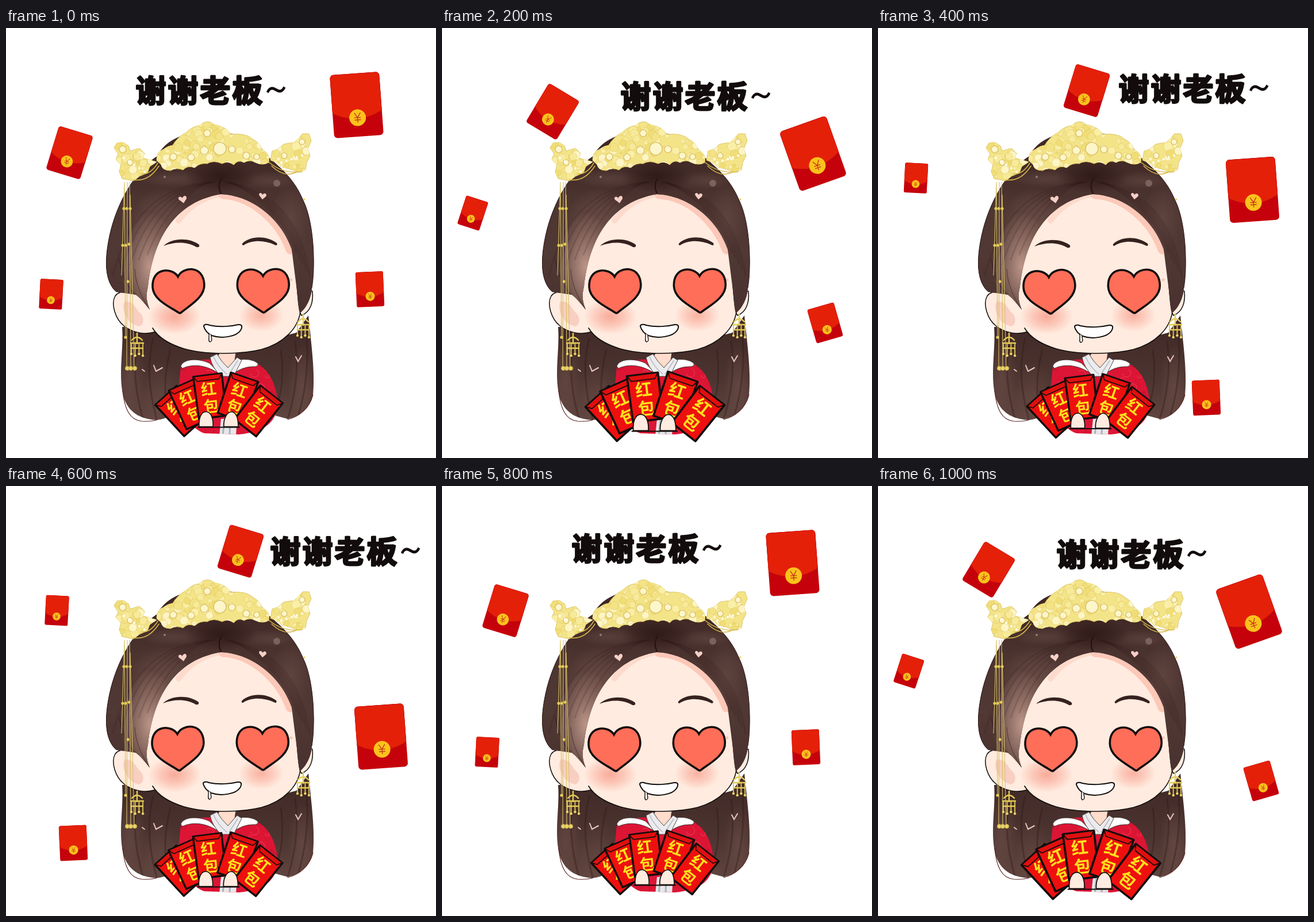
Recreate the animation shown at these times as an HTML page with a canvas. Size 748 by 748 pixels, loop 1.2 s.

```html
<!DOCTYPE html>
<html lang="zh">
<head>
<meta charset="utf-8">
<title>谢谢老板</title>
<style>
html, body { margin: 0; width: 100%; height: 100%; overflow: hidden; background: #fff; }
canvas { display: block; width: 748px; height: 748px; }
</style>
</head>
<body>
<canvas id="stage" width="748" height="748"></canvas>
<script>
const SIZE = 748, STEP = 200, STEPS = 6;
const CJK = '"Noto Sans CJK SC", "Noto Sans CJK", sans-serif';
const INK = '#120d0c', SKIN = '#ffebdf', GOLD = '#e3cb57';
const view = document.getElementById('stage').getContext('2d');
let c = view;

// Each pose: floating envelopes as [x, y, degrees], caption, face and fan offsets.
const sizes = [[62, 79], [86, 110], [40, 52], [48, 61]];
const poses = [
  { env: [[110.5, 217, 17], [610, 134, -4.2], [78.5, 463, 3], [633, 454.5, -2.5]],
    text: [0, 0], face: [0, 0], fan: [372, 655.5, 1] },
  { env: [[192.5, 145.5, 31], [645.5, 218.5, -19.5], [53.5, 322, 18], [666.5, 513, -16]],
    text: [85, 10], face: [1, 0], fan: [372, 659, 1.09] },
  { env: [[363, 109, 17], [651.5, 281.5, -4.2], [66, 261, 3], [571, 643, -2.5]],
    text: [193, -3], face: [-2, 1], fan: [371.5, 658, 1] },
  { env: [[408, 113.5, 17], [652.5, 436, -4.2], [88.5, 216.5, 3], [117, 621, -2.5]],
    text: [234, 5], face: [-1, -1], fan: [371.5, 658.5, 1] }
];

function at(x, y, deg, scale, draw) {
  c.save();
  c.translate(x, y);
  c.rotate(deg * Math.PI / 180);
  c.scale(scale, scale);
  draw();
  c.restore();
}

function shape(d, fill, line, width = 1.5) {
  const p = new Path2D(d);
  if (fill) { c.fillStyle = fill; c.fill(p); }
  if (line) { c.strokeStyle = line; c.lineWidth = width; c.stroke(p); }
  return p;
}

function dot(x, y, r, fill, line, width = 1) {
  c.beginPath();
  c.arc(x, y, r, 0, 7);
  if (fill) { c.fillStyle = fill; c.fill(); }
  if (line) { c.strokeStyle = line; c.lineWidth = width; c.stroke(); }
}

function glow(x, y, rx, ry, rgb, alpha) {
  c.save();
  c.translate(x, y);
  c.scale(rx, ry);
  const g = c.createRadialGradient(0, 0, 0, 0, 0, 1);
  g.addColorStop(0, `rgba(${rgb},${alpha})`);
  g.addColorStop(.5, `rgba(${rgb},${alpha * .55})`);
  g.addColorStop(1, `rgba(${rgb},0)`);
  c.fillStyle = g;
  c.fillRect(-1, -1, 2, 2);
  c.restore();
}

function clipped(path, draw) {
  c.save();
  c.clip(path);
  draw();
  c.restore();
}

function seeded(seed) {
  return () => (seed = seed * 16807 % 2147483647) / 2147483647;
}

function downGradient(y0, y1, ...stops) {
  const g = c.createLinearGradient(0, y0, 0, y1);
  stops.forEach((s, i) => g.addColorStop(i / (stops.length - 1), s));
  return g;
}

function lowerHair() {
  const fill = downGradient(530, 690, '#422b28', '#4c3430', '#634741');
  const left = shape('M202 520 C205 560 195 600 204 640 C210 662 226 680 262 682 C280 680 292 672 300 660 L372 600 L372 560 L250 520 Z', fill);
  const right = shape('M392 560 L505 530 L526 500 C531 550 538 600 534 638 C528 660 512 676 490 680 L460 672 L392 600 Z', fill);
  clipped(left, () => {
    glow(215, 610, 28, 70, '125,92,85', .4);
    glow(270, 640, 40, 60, '115,82,75', .35);
    shape('M232 535 Q214 600 240 685 M256 540 Q240 600 262 680 M286 560 Q270 620 282 670', null, 'rgba(45,24,22,.35)', 3);
  });
  clipped(right, () => {
    glow(515, 620, 25, 70, '125,92,85', .4);
    shape('M478 560 Q486 620 470 660 M503 545 Q512 610 490 680 M523 540 Q528 610 508 675', null, 'rgba(45,24,22,.35)', 3);
  });
  shape('M203 630 C206 664 216 682 236 684 Q250 685 262 682 M490 681 C510 676 528 662 534 638', null, '#5b2423', 1.2);
}

function robe() {
  const body = shape('M304 590 C320 576 350 575 380 577 C410 574 435 580 446 590 C465 606 474 635 472 664 C464 690 446 703 405 707 L345 705 C315 694 302 660 300 630 Z', '#dc1535');
  clipped(body, () => {
    const rnd = seeded(77);
    for (let i = 0; i < 70; i++) {
      const x = 300 + rnd() * 175, y = 582 + rnd() * 122, a = rnd() * 6;
      c.beginPath();
      c.arc(x, y, 3 + rnd() * 5, a, a + 4);
      c.strokeStyle = i % 2 ? 'rgba(255,95,110,.55)' : 'rgba(170,0,30,.5)';
      c.lineWidth = 1;
      c.stroke();
    }
    shape('M374 680 L402 680 L400 710 L371 710 Z', '#e8e7ea');
    shape('M380 680 L377 710 M390 680 L389 710', null, '#a9b4bc', 3);
  });
  shape('M304 588 C309 575 334 574 354 583 L372 602 C350 587 327 583 307 592 Z', '#fff', '#40302e', 1);
  shape('M403 577 Q427 574 438 583 Q440 590 430 589 Q410 589 392 604 Z', '#fff', '#40302e', 1);
  shape('M374 562 L400 562 L397 581 L386 594 L368 572 Z', '#ffdccb');
  shape('M355 573 L367 567 Q374 580 386 591 L402 573 L410 578 L396 606 L374 606 Q358 590 355 573 Z', '#ecebee', '#4c4545', 1);
  shape('M361 572 Q369 590 384 602 M403 579 L388 602', null, '#b5b9be', 1.5);
}

function head() {
  shape('M533 458 C535 476 530 494 514 500 L504 480 L514 458 Z', SKIN, INK);
  shape('M250 464 C225 455 198 455 190 466 C182 480 190 506 205 518 C220 530 240 534 258 529 L280 500 Z', SKIN, INK);
  shape('M206 476 C200 488 209 515 232 519 C242 515 240 500 231 494 C225 484 217 473 206 476 Z', '#f8cfc0');
  shape('M230 440 C240 370 290 285 378 282 C450 285 512 360 512 490 C508 522 484 548 445 559 C405 569 345 568 310 558 C280 549 264 537 255 522 C245 505 235 480 230 440 Z', SKIN);
  shape('M512 494 C508 522 484 548 445 559 C405 569 345 568 310 558 C280 549 264 537 255 522', null, INK, 1.7);
  glow(293, 502, 46, 31, '246,140,120', .68);
  glow(444, 500, 39, 28, '246,140,120', .6);
  shape('M300 335 C322 305 348 293 374 289', null, '#fddacb', 10);
  shape('M378 289 C432 292 478 338 495 385', null, '#fcc8b8', 17);
  dot(496, 438, 2.5, '#f7c9b6');
}

function upperHair() {
  const hair = shape('M262 224 C225 248 192 305 180 362 C172 400 170 440 192 459 C205 461 215 461 226 464 C235 471 242 480 250 490 C244 475 243 465 247 450 C254 385 282 304 374 289 C432 292 480 335 497 385 C506 420 505 470 511 496 C522 488 531 470 532 452 C538 420 537 340 517 300 C502 264 480 245 455 224 C440 194 400 180 350 180 C300 182 275 200 262 224 Z',
    downGradient(220, 480, '#3f2825', '#4c3430', '#50373390', '#4a3230'));
  shape('M180 362 C172 400 170 440 192 459 L226 464 L235 420 L215 330 Z M532 452 C538 420 537 340 517 300 L497 385 L511 496 C522 488 531 470 532 452 Z', '#4c3431');
  clipped(hair, () => {
    shape('M160 170 H550 V500 H160 Z', downGradient(220, 480, '#3f2825', '#4d3531', '#50383 '.trim() + '4', '#4a3230'));
    glow(250, 415, 50, 95, '214,172,157', .8);
    glow(272, 340, 60, 62, '150,112,102', .4);
    glow(495, 330, 34, 60, '125,92,85', .35);
    glow(290, 262, 60, 16, '110,82,76', .45);
    glow(460, 265, 50, 16, '110,82,76', .45);
    glow(374, 258, 62, 30, '40,18,16', .7);
    for (let i = 0; i < 5; i++) {
      shape(`M${364 - i * 3} 268 Q${225 + i * 14} ${272 + i * 8} ${186 + i * 15} ${430 - i * 9}`, null, 'rgba(45,22,20,.16)', 3);
      shape(`M${380 + i * 3} 268 Q${505 - i * 6} ${285 + i * 8} ${528 - i * 6} ${430 - i * 10}`, null, 'rgba(45,22,20,.16)', 3);
    }
    shape('M375 262 Q366 275 376 291', null, '#27110f', 2);
    shape('M226 464 Q206 450 196 400 M250 490 Q226 455 224 420', null, 'rgba(45,22,20,.4)', 1.5);
  });
  shape('M262 224 C225 248 192 305 180 362 C172 400 170 440 192 459 M532 452 C538 420 537 340 517 300 C502 264 480 245 455 224', null, '#2e1b19', 1);

  const love = 'M0 -2 C-3 -8 -9 -4 -6 0 L1 7 L7 0 C9 -5 3 -8 0 -2 Z';
  at(307, 298, -8, 1, () => shape(love, '#f6cfc6'));
  at(446, 292, 8, .9, () => shape(love, '#f6cfc6'));
  dot(471, 270, 6, '#7c625d');
  dot(276, 259, 2, '#927a75');
  shape('M257 587 L261 597 L272 591 M237 594 L241 597 M504 572 L508 580 L514 570', null, '#e6c6bd', 2);
}

function jewels(path, [x, y, w, h], count, seed) {
  const rnd = seeded(seed), tones = ['#faefa6', '#f3e385', '#f0dd76', '#f7ea9a', '#fdf5c4'];
  const p = shape(path, '#f4e488', '#dcc566', 1);
  clipped(p, () => {
    for (let i = 0; i < count; i++)
      dot(x + rnd() * w, y + rnd() * h, 2 + rnd() * 6, tones[i % 5], 'rgba(216,188,88,.4)', 1);
  });
}

function tiara() {
  jewels('M262 230 Q262 215 274 211 Q282 205 290 204 Q298 190 314 181 Q325 171 336 170 Q350 157 362 168 Q384 172 391 185 Q418 182 430 194 Q442 200 446 212 Q460 218 457 234 Q446 240 434 234 Q424 228 414 234 Q404 228 396 238 Q386 230 376 236 Q360 229 350 236 Q338 234 328 243 Q316 238 308 247 Q296 242 286 248 Q272 248 270 238 Z',
    [260, 162, 200, 90], 150, 11);
  jewels('M188 208 L193 200 L204 199 L213 205 L216 214 L232 209 L241 218 L238 226 L262 233 L250 241 L246 252 L232 258 L222 266 L202 262 L197 250 L200 238 L191 229 L195 219 Z',
    [186, 198, 76, 72], 45, 23);
  jewels('M509 192 L516 184 L527 184 L531 196 L525 210 L529 222 L523 234 L521 247 L508 251 L496 246 L480 242 L470 234 L460 230 L463 214 L474 210 L483 202 L501 199 Z',
    [458, 182, 74, 72], 45, 37);
  [[372, 210, 11], [345, 213, 7], [393, 211, 6], [322, 225, 6], [291, 224, 6], [418, 222, 6], [350, 183, 6], [436, 224, 5], [203, 211, 6], [515, 198, 5], [484, 222, 5], [216, 234, 5]]
    .forEach(([x, y, r]) => dot(x, y, r, '#fdf6cb', '#d8bd60', 1.2));
  for (let i = 0; i < 5; i++) {
    dot(205 + i * 9, 226 + i * 6, 2, '#fff');
    dot(479 + i * 9, 234 - i * 3, 2, '#fff');
  }
  shape('M222 264 Q248 268 266 240 M235 254 Q252 255 264 235 M458 234 Q482 254 515 250 M462 240 Q485 262 506 250', null, '#d7b94b', 1.5);
}

function charm(x, y) {
  at(x, y, 0, 1, () => {
    shape('M0 -20 V-2 M-9 -8 Q0 -18 9 -8 M-11 -3 H11 M-10 6 H10', null, GOLD, 2.5);
    for (let i = 0; i < 4; i++) {
      const px = -10 + i * 6.7, end = 16 + (i % 2) * 3;
      shape(`M${px} -3 V${end}`, null, GOLD, 1.8);
      dot(px, end, 1.8, '#f2e07f', GOLD);
    }
  });
}

function tassels() {
  shape('M206 268 L201 430 M206 268 L208 540 M211 268 L210 592 M215 268 L217 592 M216 290 L223 592', null, '#d9c266', 1.1);
  [[205, 314], [210, 314], [216, 314], [203, 378], [208, 378], [214, 376], [212, 441], [208, 538]]
    .forEach(([x, y]) => dot(x, y, 2.6, GOLD));
  [211, 217, 224].forEach(x => dot(x, 592, 3.6, '#e8d468', '#c6aa46'));
  charm(228, 551);
  charm(517, 519);
  dot(519, 298, 1.5, GOLD);
}

function features([dx, dy]) {
  at(dx, dy, 0, 1, () => {
    shape('M274 379 C290 364 320 365 336 377 C337 381 335 382 331 381 C313 371 294 372 274 379 Z', '#35211f');
    shape('M411 375 C425 361 453 361 471 374 C473 378 470 379 467 377 C450 369 428 368 413 378 Q410 378 411 375 Z', '#35211f');
    const heart = 'M0 -26 C-9 -43 -45 -45 -45 -10 C-45 12 -18 25 -3 36 Q0 39 3 36 C18 25 45 12 45 -10 C45 -45 9 -43 0 -26 Z';
    at(300.5, 458.5, -3, 1, () => shape(heart, '#ff6e59', INK, 3.6));
    at(447.5, 457.5, -1, 1, () => shape(heart, '#ff6e59', INK, 3.6));
    shape('M344 519 C344 515 350 515 354 517 C372 521 392 519 404 516 C412 515 411 521 408 526 C401 537 375 541 358 535 C350 531 346 526 344 519 Z', '#fff', INK, 2);
    shape('M353 531 C354 539 351 545 355 546 C360 545 357 539 357 535', '#fff', INK, 1.4);
  });
}

function packet(x, y, deg) {
  at(x, y, deg, 1, () => {
    shape('M-25 -37 H25 L24 37 H-24 Z', '#ee100f', INK, 3.4);
    shape('M-24 -36 L-19 -28 H19 L24 -36', '#e00f0f', INK, 1.6);
    c.fillStyle = '#ffe11c';
    c.font = `700 27px ${CJK}`;
    c.textAlign = 'center';
    c.textBaseline = 'middle';
    c.fillText('红', -1, -13);
    c.fillText('包', 0, 17);
  });
}

function fan([x, y, scale]) {
  at(x, y, 0, scale, () => {
    c.translate(-372, -656);
    c.lineJoin = 'round';
    packet(303, 667, -42);
    packet(321, 655, -24);
    packet(355, 641, -7);
    packet(403, 643, 19);
    packet(439, 667, 38);
    shape('M336 694 C335 680 339 668 348 668 C357 668 361 681 360 694 Z', SKIN, INK, 1.6);
    shape('M379 694 C378 681 384 668 393 668 C402 670 404 682 404 694 Z', SKIN, INK, 1.6);
    shape('M334 695 H406', null, INK, 2);
  });
}

function envelope([x, y, deg], [w, h]) {
  at(x, y, deg, h / 110, () => {
    const half = w / h * 55;
    c.beginPath();
    c.roundRect(-half, -55, half * 2, 110, 6);
    c.fillStyle = '#c5020b';
    c.fill();
    c.clip();
    shape(`M${-half} -55 H${half} V12 Q0 36 ${-half} 12 Z`, '#e42009', '#b80b0a', 1);
    dot(0, 22, 14.5, '#fbc21b');
    shape('M-5 14 L0 22 L5 14 M0 22 V30 M-5 22 H5 M-5 26 H5', null, '#c4371a', 1.4);
  });
}

function caption([dx, dy]) {
  at(dx, dy, 0, 1, () => {
    c.fillStyle = c.strokeStyle = INK;
    c.lineWidth = 3;
    c.lineJoin = 'round';
    c.textAlign = 'center';
    c.textBaseline = 'alphabetic';
    c.font = `900 53px ${CJK}`;
    [...'谢谢老板'].forEach((ch, i) => {
      c.fillText(ch, 252 + i * 56, 129);
      c.strokeText(ch, 252 + i * 56, 129);
    });
    c.font = `500 72px ${CJK}`;
    at(470, 110, -8, 1, () => c.fillText('~', 0, 24));
  });
}

// The still part of the figure is painted once.
const still = document.createElement('canvas');
still.width = still.height = SIZE;
c = still.getContext('2d');
c.lineCap = 'round';
[lowerHair, robe, head, upperHair, tiara, tassels].forEach(part => part());
c = view;
c.lineCap = 'round';

function paint(pose) {
  c.fillStyle = '#fff';
  c.fillRect(0, 0, SIZE, SIZE);
  c.drawImage(still, 0, 0);
  features(pose.face);
  fan(pose.fan);
  pose.env.forEach((e, i) => envelope(e, sizes[i]));
  caption(pose.text);
}

function tick() {
  const step = Math.floor(performance.now() / STEP) % STEPS;
  paint(poses[step % poses.length]);
  requestAnimationFrame(tick);
}
tick();
</script>
</body>
</html>
```
